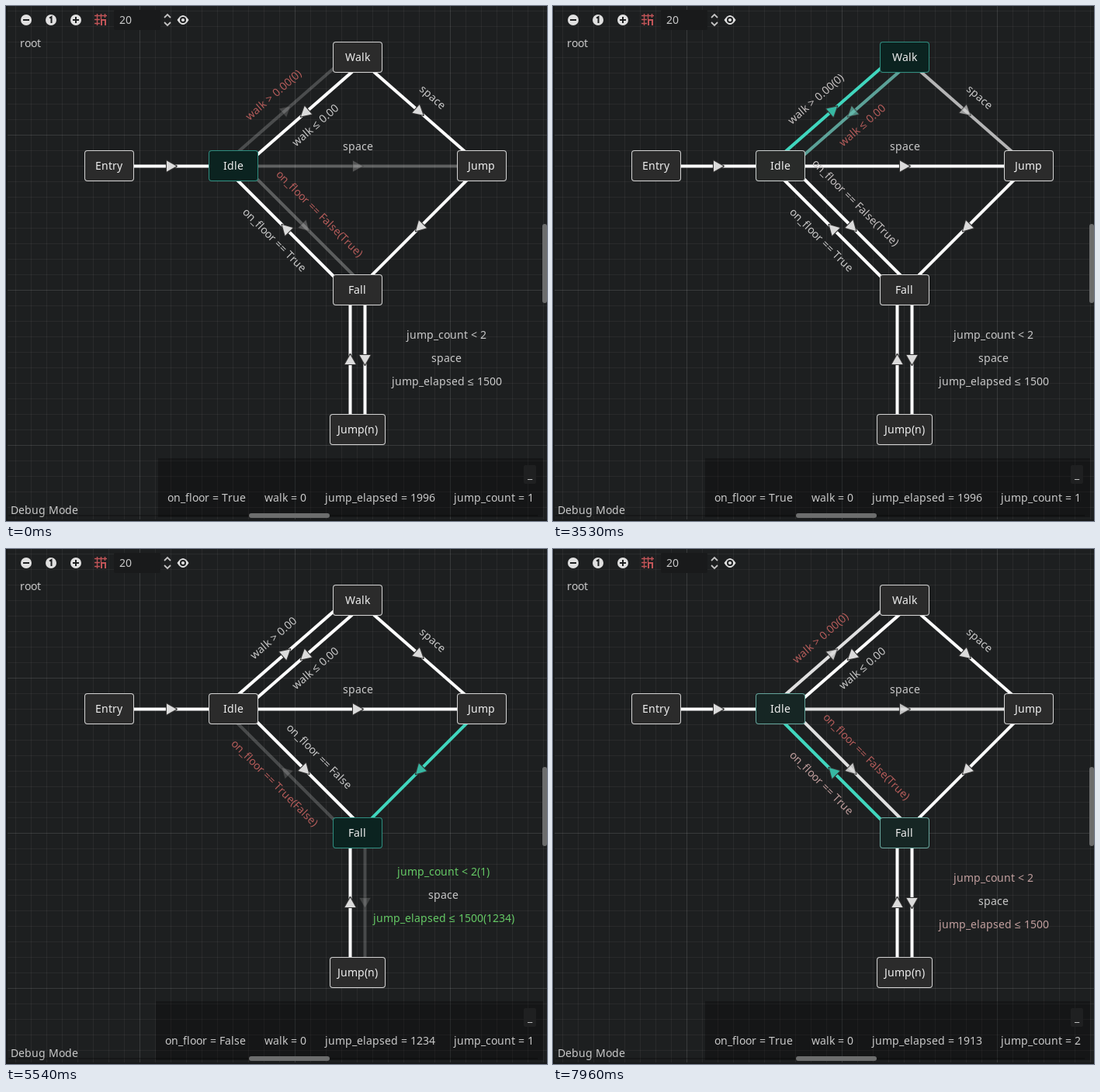
Recreate the animation shown at these times as an HTML page with a canvas. Size 697x664 px, loop 8000 ms.

```html
<!DOCTYPE html>
<html lang="en">
<head>
<meta charset="utf-8">
<title>State machine debugger</title>
<style>
html, body { margin: 0; width: 100%; height: 100%; overflow: hidden; background: #1d1f20; }
canvas { display: block; }
</style>
</head>
<body>
<canvas id="stage" width="697" height="664"></canvas>
<script>
const g = document.getElementById('stage').getContext('2d');
const LOOP = 8000;
const WHITE = [255, 255, 255], TEAL = [64, 214, 190];
const GREY = [200, 200, 200], RED = [180, 92, 90], GREEN = [101, 201, 101], MINT = [130, 208, 197];

// Centre of each state's box
const NODES = {
  Entry: [133, 206], Idle: [293, 206], Walk: [453, 66],
  Jump: [613, 206], Fall: [453, 366], 'Jump(n)': [453, 546]
};

// From, to, and an optional delay of the idle pulse
const LINKS = [
  ['Entry', 'Idle'], ['Idle', 'Walk', 1700], ['Walk', 'Idle'], ['Walk', 'Jump'], ['Idle', 'Jump'],
  ['Jump', 'Fall'], ['Idle', 'Fall'], ['Fall', 'Idle'], ['Fall', 'Jump(n)'], ['Jump(n)', 'Fall']
];

// States in the order they are entered; everything else follows from this
const LEAP = 4307, AIR = 4430, LEAP2 = 5834, LAND = 7747;
const VISITS = [
  [-1580, 'Idle'], [1900, 'Walk'], [2390, 'Idle'], [2430, 'Walk'], [3160, 'Idle'], [3200, 'Walk'],
  [3900, 'Idle'], [LEAP, 'Jump'], [AIR, 'Fall'], [LEAP2, 'Fall'], [LAND, 'Idle']
].map(([start, name], i, all) => ({
  start, name, from: i ? all[i - 1][1] : '', end: i + 1 < all.length ? all[i + 1][0] : Infinity
}));

const clamp = v => Math.max(0, Math.min(1, v));
const mix = (a, b, k) => a.map((v, i) => v + (b[i] - v) * k);
const rgb = c => `rgb(${c.map(Math.round)})`;

// 1 while a state is active, with a linear rise and fall
function glow(name, t, rise, fall) {
  const levels = VISITS.filter(v => v.name == name && v.start <= t).map(v =>
    clamp((Math.min(t, v.end) - v.start + 1) / rise) * clamp(1 - (t - v.end) / fall));
  return Math.max(0, ...levels);
}

// A link lights up when taken and fades once its target is left
function tint([from, to], t) {
  const levels = VISITS.filter(v => v.from == from && v.name == to && v.start <= t).map(v =>
    1 - clamp((t - v.end) / 600) ** 2);
  return Math.max(0, ...levels);
}

// Links out of the active state dim, then pulse slowly
function opacity([from, , delay = 0], t) {
  const visit = VISITS.filter(v => v.name == from && v.start <= t).pop();
  if (!visit) return 1;
  const age = Math.min(t, visit.end) - visit.start, dim = 530;
  const wave = (1 - Math.cos((age - dim - delay) / 5700 * 2 * Math.PI)) / 2;
  const level = age < dim ? 1 - .85 * (age / dim) ** 2 : .15 + .41 * wave;
  return level + (1 - level) * clamp((t - visit.end) / 200);
}

// Whole-pixel glyph advances, as in hinted type
const advance = ch => Math.round(g.measureText(ch).width);
const width = s => [...s].reduce((w, ch) => w + advance(ch), 0);
const boxWidth = name => Math.max(64, width(name) + 20);

function text(s, x, y, color = GREY, align = 0) {
  g.fillStyle = rgb(color);
  x = Math.floor(x - width(s) * align);
  for (const ch of s) {
    g.fillText(ch, x, y);
    x += advance(ch);
  }
}

function box(x, y, w, h, fill, r = 0) {
  g.fillStyle = fill;
  g.beginPath();
  g.roundRect(x, y, w, h, r);
  g.fill();
}

function stroke(color, w, ...lines) {
  g.strokeStyle = color;
  g.lineWidth = w;
  g.beginPath();
  for (const [x, y, ...rest] of lines) {
    g.moveTo(x, y);
    for (let i = 0; i < rest.length; i += 2) g.lineTo(rest[i], rest[i + 1]);
  }
  g.stroke();
}

function disc(x, y, r, fill) {
  g.fillStyle = fill;
  g.beginPath();
  g.arc(x, y, r, 0, 7);
  g.fill();
}

function grid() {
  box(0, 0, 697, 664, '#1d1f20');
  for (let i = 0; i < 35; i++) {
    const fill = `rgba(255,255,255,${i % 10 == 8 ? .12 : .05})`;
    box(12 + i * 20, 0, 1, 664, fill);
    box(0, 6 + i * 20, 697, 1, fill);
  }
  box(0, 0, 2, 664, '#17191a');
  box(0, 662, 697, 2, '#17191a');
}

function toolbar() {
  const light = '#e0e0e0', dark = '#1d1f20', red = '#c25558';
  for (const x of [26, 58, 90]) disc(x, 18, 7, light);
  stroke(dark, 2, [22, 18, 30, 18], [86, 18, 94, 18], [90, 14, 90, 22], [56, 15.5, 58.5, 14, 58.5, 22]);
  stroke(red, 1.3, [117.5, 10, 117.5, 25], [122.5, 10, 122.5, 17], [127.5, 10, 127.5, 15],
    [114, 12.5, 130, 12.5], [114, 17.5, 121, 17.5], [114, 22.5, 121, 22.5]);
  stroke(red, 2, [123, 25, 123, 18, 128, 18, 128, 25]);
  box(139, 5, 60, 26, '#191a1b', 2);
  text('20', 146, 23);
  stroke('#c4c4c4', 1.8, [204, 15, 208, 11, 212, 15], [204, 21, 208, 25, 212, 21]);
  g.fillStyle = light;
  g.beginPath();
  g.moveTo(220.5, 18);
  g.quadraticCurveTo(228, 6, 235.5, 18);
  g.quadraticCurveTo(228, 30, 220.5, 18);
  g.fill();
  disc(228, 18, 4, dark);
  disc(228, 18, 2.1, light);
  text('root', 18, 53);
}

// Part of a link between the two boxes; opposite links run side by side
function geometry([from, to]) {
  const [ax, ay] = NODES[from], [bx, by] = NODES[to];
  const angle = Math.atan2(by - ay, bx - ax), c = Math.cos(angle), s = Math.sin(angle);
  const side = LINKS.some(l => l[0] == to && l[1] == from) ? 10 : 0;
  const dx = s * side, dy = -c * side;
  const exit = (name, ux, uy, ox, oy) => Math.min(
    (boxWidth(name) / 2 - ox * Math.sign(ux)) / Math.abs(ux),
    (20 - oy * Math.sign(uy)) / Math.abs(uy));
  const start = exit(from, c, s, dx, dy);
  const end = Math.hypot(bx - ax, by - ay) - exit(to, -c, -s, dx, dy);
  const mid = (start + end) / 2;
  return { x: ax + dx + c * mid, y: ay + dy + s * mid, angle, half: (end - start) / 2 };
}

function drawLink(link, t) {
  const { x, y, angle, half } = geometry(link);
  const color = mix(WHITE, TEAL, tint(link, t));
  g.save();
  g.globalAlpha = opacity(link, t);
  g.translate(x, y);
  g.rotate(angle);
  g.translate(0, .5);
  g.lineCap = 'square';
  stroke(rgb(color), 4, [-half, 0, half, 0]);
  g.lineJoin = 'round';
  stroke('#333', 2.2, [6.5, 0, -6, -7, -6, 7, 6.5, 0]);
  g.fillStyle = rgb(mix([0, 0, 0], color, .86));
  g.fill();
  g.restore();
}

// Text along a link, kept upright; red while its condition holds the state
function label(from, to, t, s, hidden = '') {
  const { x, y, angle } = geometry([from, to]);
  const back = Math.cos(angle) < -.01;
  const conditional = s != 'space';
  const red = conditional ? glow(from, t, 1, 350) : 0;
  const shift = red < .1 ? width(hidden) / 2 : 0;
  g.save();
  g.translate(x, y);
  g.rotate(back ? angle + Math.PI : angle);
  text(s + hidden, .5 - shift, back ? 25 : -20, mix(GREY, RED, red), .5);
  g.restore();
}

function labels(t, elapsed, count) {
  const air = t >= AIR && t < LAND;
  const value = v => t < LEAP || t >= LAND ? `(${v})` : '';
  label('Idle', 'Walk', t, 'walk > 0.00', value(0));
  label('Walk', 'Idle', t, 'walk ≤ 0.00');
  label('Walk', 'Jump', t, 'space');
  label('Idle', 'Jump', t, 'space');
  label('Idle', 'Fall', t, 'on_floor == False', value('True'));
  label('Fall', 'Idle', t, 'on_floor == True' + (air ? '(False)' : ''));

  const x = air ? 564 : 568, y = air && count < 2 ? 421 : 429;
  const after = mix(GREY, RED, glow('Fall', t, 1, 350));
  const line = (s, v, ok, row) =>
    text(s + (air ? `(${v})` : ''), x, y + row * 30, air ? (ok ? GREEN : RED) : after, .5);
  line('jump_count < 2', count, count < 2, 0);
  text('space', x, y + 30, air && count > 1 ? MINT : GREY, .5);
  line('jump_elapsed ≤ 1500', elapsed, elapsed <= 1500, 2);
}

function drawNode(name, t) {
  const [x, y] = NODES[name], w = boxWidth(name), k = glow(name, t, 320, 600);
  box(x - w / 2, y - 20, w, 40, rgb(mix([212, 212, 212], [47, 142, 128], k)), 4);
  box(x - w / 2 + 1, y - 19, w - 2, 38, rgb(mix([43, 43, 43], [11, 35, 32], k)), 3);
  text(name, x, y + 5, [238, 238, 238], .5);
}

function status(t, elapsed, count) {
  const items = [
    'on_floor = ' + (t >= AIR && t < LAND ? 'False' : 'True'),
    'walk = 0',
    'jump_elapsed = ' + elapsed,
    'jump_count = ' + count
  ];
  let x = 680 - items.reduce((w, s) => w + width(s), 24 * 3);
  box(x - 12, 583, 704 - x, 76, 'rgba(0,0,0,.28)');
  box(667, 592, 16, 24, '#1f2021', 2);
  text('_', 672, 609);
  for (const s of items) {
    text(s, x, 639);
    x += width(s) + 24;
  }
  text('Debug Mode', 6, 655);
  box(3, 656, 682, 2, 'rgba(0,0,0,.25)');
  box(313, 654, 104, 6, '#6c6d6d', 3);
  box(691, 281, 6, 102, '#6c6d6d', 3);
}

function draw(now) {
  const t = now % LOOP;
  const count = t < LEAP2 ? 1 : 2;
  const elapsed = t < LEAP ? 1996 : Math.floor(Math.min(LAND, t) - (count > 1 ? LEAP2 : LEAP));
  g.font = '14px "Noto Sans", sans-serif';
  grid();
  LINKS.forEach(link => drawLink(link, t));
  Object.keys(NODES).forEach(name => drawNode(name, t));
  labels(t, elapsed, count);
  status(t, elapsed, count);
  toolbar();
}

const start = performance.now();
function frame() {
  draw(performance.now() - start);
  requestAnimationFrame(frame);
}
frame();
</script>
</body>
</html>
```
